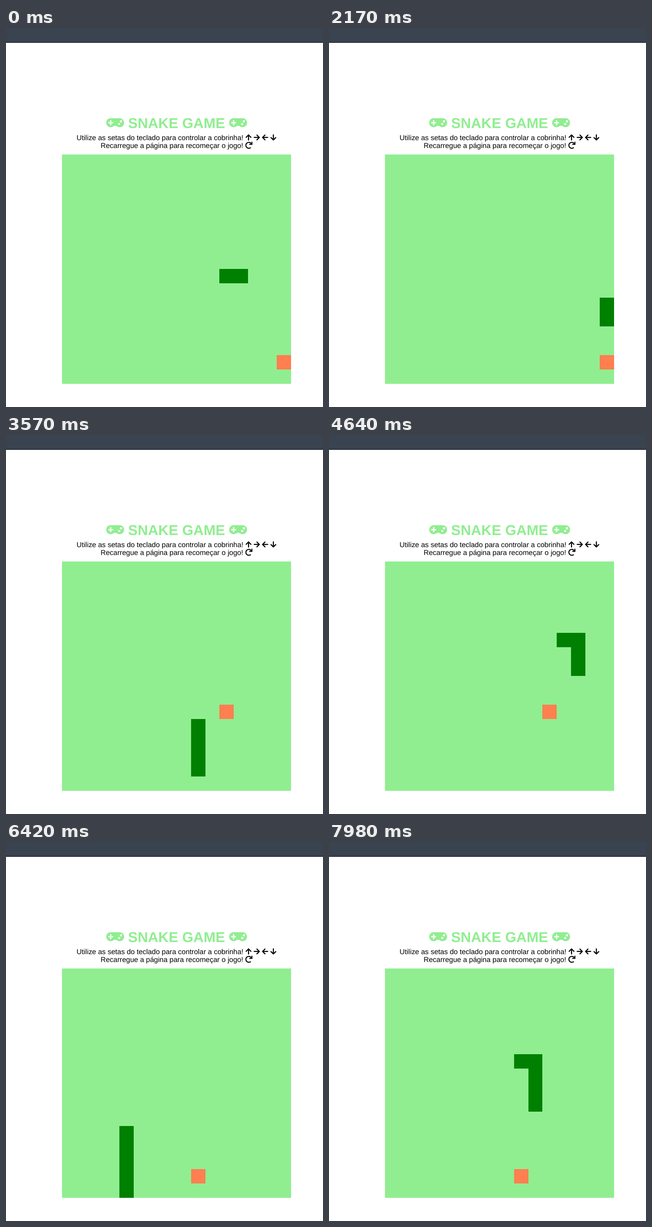
An HTML page with a canvas that plays this animation: 685x818 px, repeating every 8000 ms.

```html
<!DOCTYPE html>
<html lang="pt-BR">
<head>
<meta charset="utf-8">
<title>Snake Game</title>
<style>
html, body { margin: 0; width: 685px; height: 818px; overflow: hidden; background: #fff; }
canvas { display: block; }
</style>
</head>
<body>
<canvas id="stage" width="685" height="818"></canvas>
<script>
const ctx = document.getElementById('stage').getContext('2d');
const LOOP = 8000, GRID = 16, CELL = 495 / GRID, LEFT = 121.15, TOP = 272.6;
const LIGHT = '#90ee90', SNAKE = '#008000', FOOD = '#ff7f50';
const FONT = '"Liberation Sans", Arial, sans-serif';
const DIRS = { R: [1, 0], L: [-1, 0], U: [0, -1], D: [0, 1] };

// Bursts of moves: start time, end time, one direction per step
const bursts = [
  [70, 220, 'RRR'], [390, 540, 'RRR'], [690, 920, 'RRRR'], [1090, 1240, 'RRR'],
  [1390, 1620, 'RRRR'], [1790, 2020, 'RRDD'], [2170, 2330, 'DDD'], [2480, 2710, 'DDLL'],
  [2860, 3020, 'LLL'], [3170, 3400, 'LUUU'], [3570, 3720, 'URR'], [3870, 4110, 'RRUU'],
  [4260, 4490, 'UUUU'], [4640, 4800, 'LLD'], [4950, 5180, 'DDDD'], [5330, 5490, 'DLL'],
  [5640, 5870, 'LLLL'], [6040, 6190, 'LDD'], [6340, 6570, 'DDRR'], [6740, 6970, 'RRRR'],
  [7120, 7280, 'UUU'], [7430, 7660, 'UUUU'], [7830, 7980, 'UUL']
];
const foods = [[15, 14], [14, 15], [11, 10], [9, 14]];

// Play the game once and keep every state with its start time
function play() {
  let body = [[12, 8], [11, 8]], eaten = 0;
  const states = [{ time: 0, body, food: foods[0] }];
  for (const [start, end, moves] of bursts) {
    const gap = (end - start) / (moves.length - 1);
    [...moves].forEach((m, i) => {
      const head = body[0].map((v, axis) => (v + DIRS[m][axis] + GRID) % GRID);
      const hit = String(head) === String(foods[eaten]);
      body = [head, ...(hit ? body : body.slice(0, -1))];
      if (hit) eaten++;
      states.push({ time: start + Math.round(i * gap / 10) * 10, body, food: foods[eaten] });
    });
  }
  return states;
}
const states = play();

function text(str, x, y, size, color, weight = '') {
  ctx.font = `${weight} ${size}px ${FONT}`;
  ctx.fillStyle = color;
  ctx.fillText(str, x, y);
}

// Draw an icon in a 512-unit em box that sits on the text baseline
function icon(x, baseline, size, draw) {
  ctx.save();
  ctx.translate(x, baseline - size * 0.875);
  ctx.scale(size / 512, size / 512);
  draw();
  ctx.restore();
}

function arrow(turn) {
  ctx.translate(224, 256);
  ctx.rotate(turn * Math.PI / 2);
  ctx.lineWidth = 76;
  ctx.lineCap = ctx.lineJoin = 'round';
  ctx.strokeStyle = '#000';
  ctx.stroke(new Path2D('M-172 -8L0 -180L172 -8M0 -180V186'));
}

function reload() {
  ctx.fillStyle = '#000';
  ctx.fill(new Path2D('M512 0H441L445 95A248 248 0 1 0 422 440L372 388A176 176 0 1 1 402 158L288 153V224H512Z'));
}

function gamepad() {
  ctx.fillStyle = LIGHT;
  ctx.fill(new Path2D('M480 96H160A160 160 0 1 0 274 368H366A160 160 0 1 0 480 96Z'));
  ctx.fillStyle = '#fff';
  ctx.beginPath();
  ctx.roundRect(72, 232, 176, 48, 12);
  ctx.roundRect(136, 168, 48, 176, 12);
  ctx.fill();
  for (const [x, y] of [[464, 304], [528, 208]]) {
    ctx.beginPath();
    ctx.arc(x, y, 40, 0, Math.PI * 2);
    ctx.fill();
  }
}

function header() {
  ctx.fillStyle = '#394450';
  ctx.fillRect(0, 0, 685, 31);
  ctx.fillStyle = '#1c2130';
  ctx.fillRect(0, 30.5, 685, 1.5);

  const big = 30.94, small = 15.47;
  icon(216.5, 216, big, gamepad);
  text('SNAKE GAME', 263.8, 216, big, LIGHT, 'bold');
  icon(482.2, 216, big, gamepad);

  text('Utilize as setas do teclado para controlar a cobrinha!', 152.6, 242, small, '#000');
  [0, 1, 3, 2].forEach((turn, i) => icon(517.3 + i * 17.9, 242, small, () => arrow(turn)));
  text('Recarregue a página para recomeçar o jogo!', 204.6, 259, small, '#000');
  icon(517, 259, small, reload);
}

function block(col, row, color, span = 1) {
  const x = Math.round(LEFT + col * CELL), y = Math.round(TOP + row * CELL);
  ctx.fillStyle = color;
  ctx.fillRect(x, y, Math.round(LEFT + (col + span) * CELL) - x, Math.round(TOP + (row + span) * CELL) - y);
}

function render(t) {
  const { body, food } = states.findLast(s => s.time <= t);
  block(0, 0, LIGHT, GRID);
  for (const [col, row] of body) block(col, row, SNAKE);
  block(...food, FOOD);
}

function frame(now) {
  render(Math.max(0, now - begin) % LOOP);
  requestAnimationFrame(frame);
}

ctx.textRendering = 'geometricPrecision';
ctx.fillStyle = '#fff';
ctx.fillRect(0, 0, 685, 818);
header();
render(0);
const begin = performance.now();
requestAnimationFrame(frame);
</script>
</body>
</html>
```
